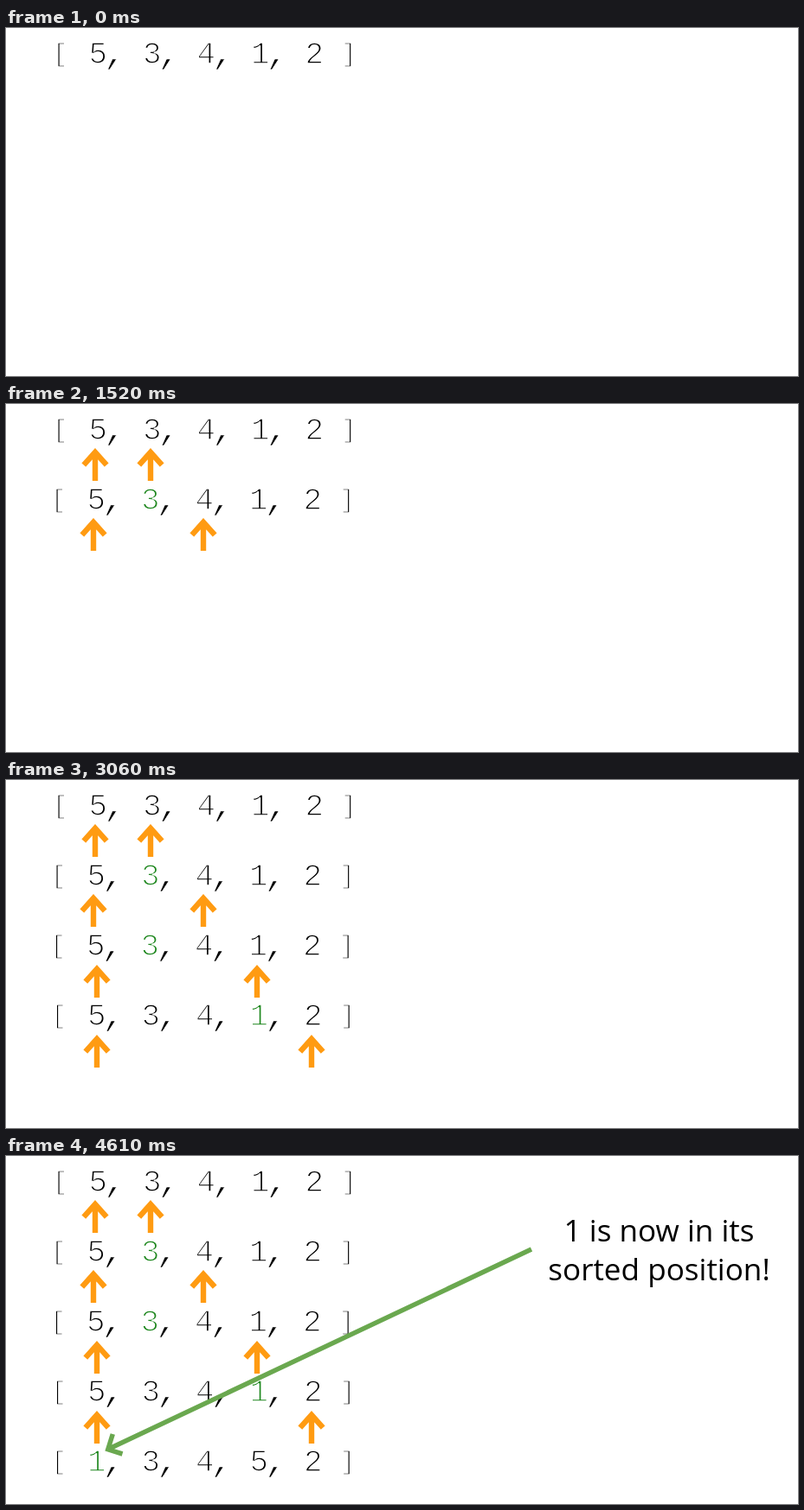
An HTML page that plays this animation: 915 px wide and 403 px high, repeating every 5340 ms.

```html
<!DOCTYPE html>
<html lang="en">
<head>
<meta charset="utf-8">
<title>Selection sort pass</title>
<style>
  html, body { margin: 0; width: 100%; height: 100%; overflow: hidden; background: #fff; }
  svg { display: block; }
  /* A white outline thins the strokes of the monospaced digits. */
  .list {
    font: 36px "Liberation Mono", monospace; letter-spacing: -0.78px; white-space: pre;
    stroke: #fff; stroke-width: 1.5;
  }
  .bracket { font-size: 30px; letter-spacing: 2.82px; baseline-shift: 2px; }
  .comma { font-style: italic; stroke-width: 0.6; }
  .minimum { fill: #1c861c; }
  .pointer { fill: none; stroke: #ff9b12; stroke-width: 6.4; }
  .note { font: 35.1px "Open Sans", sans-serif; text-anchor: middle; }
  .callout { fill: none; stroke: #6aa84f; stroke-width: 5.5; }
</style>
</head>
<body>
<svg id="stage" width="915" height="403" viewBox="0 0 915 403"></svg>
<script>
const LOOP = 5340;
const ROW_HEIGHT = 81.1;

// green: index of the highlighted value; pointers: x of each arrow
const rows = [
  { x: 53.8, values: [5, 3, 4, 1, 2], green: -1, pointers: [103, 167], arrowY: 51 },
  { x: 51.8, values: [5, 3, 4, 1, 2], green: 1, pointers: [101, 228], arrowY: 132 },
  { x: 51.3, values: [5, 3, 4, 1, 2], green: 1, pointers: [105, 290], arrowY: 214 },
  { x: 52.3, values: [5, 3, 4, 1, 2], green: 3, pointers: [105, 353], arrowY: 295 },
  { x: 52.3, values: [1, 3, 4, 5, 2], green: 0, pointers: [] },
];

// Each fade jumps through a few opacities, evenly spaced from `from` to 1.
const fades = [
  { times: [570, 640, 720, 800], from: 0.24 },
  { times: [1290, 1360, 1440, 1520], from: 0.07 },
  { times: [2100, 2180, 2260], from: 0.22 },
  { times: [2900, 2990, 3060], from: 0.07 },
  { times: [3620, 3700, 3780], from: 0.22 },
  { times: [4450, 4530, 4610], from: 0.22 },
];

const span = (name, content) => `<tspan class="${name}">${content}</tspan>`;
const group = content => `<g class="fade">${content}</g>`;

function listText({ x, values, green }, index) {
  const items = values.map((value, i) => i === green ? span('minimum', value) : value);
  const body = items.join(span('comma', ',') + ' ');
  return `<text class="list" x="${x}" y="${40.6 + index * ROW_HEIGHT}">` +
    `${span('bracket', '[')} ${body} ${span('bracket', ']')}</text>`;
}

function pointerArrows({ pointers, arrowY }) {
  return pointers.map(x =>
    `<path class="pointer" transform="translate(${x} ${arrowY})"
      d="M-13.2 19.6 L0 4.8 L13.2 19.6 M0 6 V38"/>`).join('');
}

const callout = `
  <path class="callout" d="M607 108 L118 339.5 M123.3 322 L117.8 339.8 L134.5 345"/>
  <text class="note" x="754.5" y="98.7">1 is now in its</text>
  <text class="note" x="754.5" y="143.7">sorted position!</text>`;

const stage = document.getElementById('stage');
stage.innerHTML = listText(rows[0], 0) + group(pointerArrows(rows[0])) +
  rows.slice(1).map((row, i) => group(listText(row, i + 1) + pointerArrows(row))).join('') +
  group(callout);
const groups = stage.querySelectorAll('.fade');

function opacityAt({ times, from }, time) {
  const step = times.filter(t => t <= time).length - 1;
  return step < 0 ? 0 : from + (1 - from) * step / (times.length - 1);
}

function draw(now) {
  const time = now % LOOP;
  fades.forEach((fade, i) => groups[i].setAttribute('opacity', opacityAt(fade, time)));
  requestAnimationFrame(draw);
}
draw(performance.now());
</script>
</body>
</html>
```
